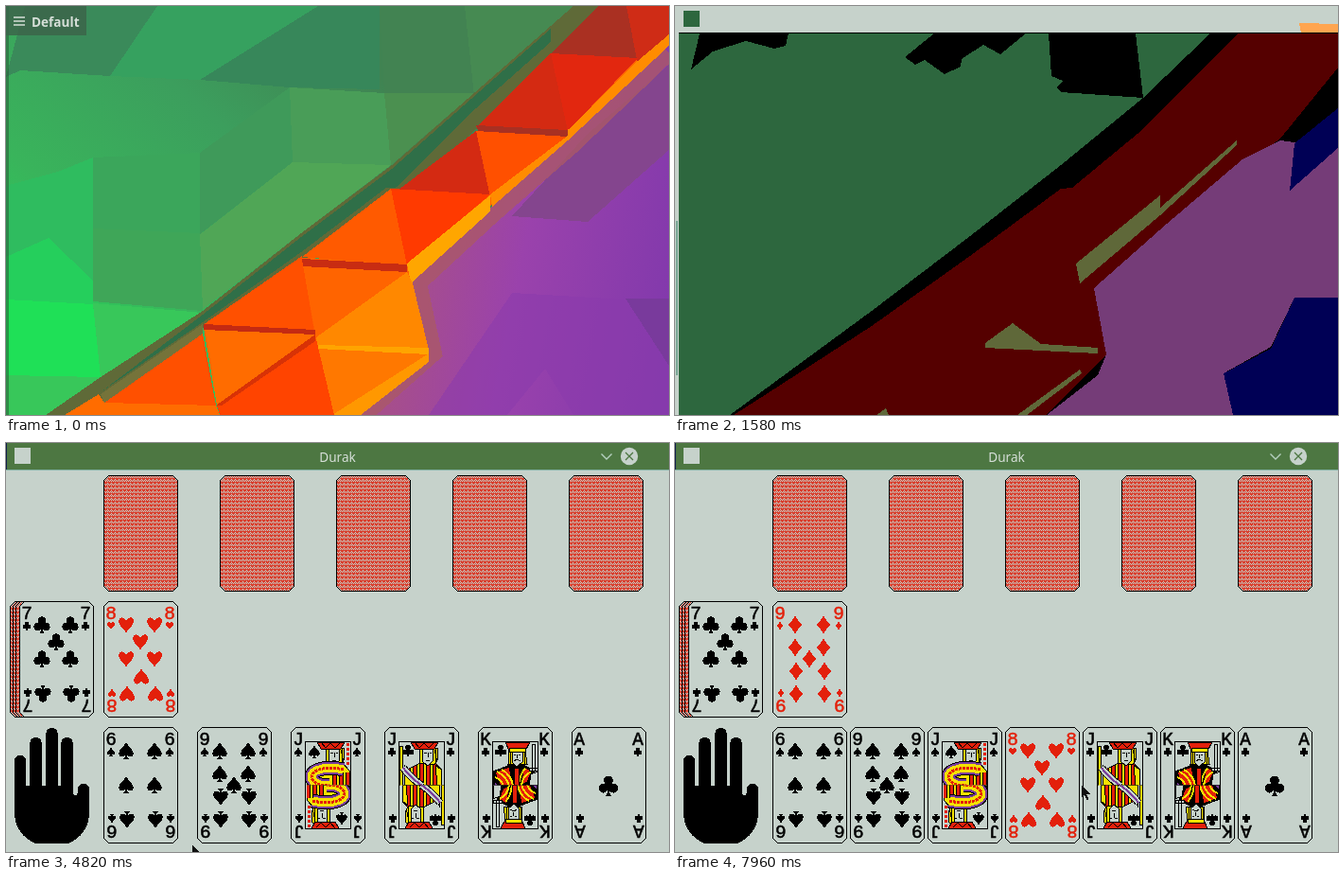
Recreate the animation shown at these times as an HTML page without scripts. Size 701 by 432 pixels, loop 8 s.

```html
<!DOCTYPE html>
<html lang="en">
<head>
<meta charset="utf-8">
<title>Card game</title>
<style>
html, body { margin: 0; width: 100%; height: 100%; overflow: hidden; background: #c6d2cb; }
svg { display: block; }
.stage { width: 701px; height: 432px; }
.desktop, .flash, .game { shape-rendering: crispEdges; }
.smooth { shape-rendering: auto; }
.rank { font: 19.5px "Liberation Mono", monospace; text-anchor: middle; stroke: currentColor; stroke-width: .5; }
.ui { font: 13.6px "Noto Sans", sans-serif; fill: #d6dfd8; }
.bold { font-weight: 700; }
.red { fill: #e3200b; color: #e3200b; }
.ink { stroke: #000; stroke-width: 1; }
.line { fill: none; stroke: #000; }

.desktop, .flash, .game, .deal, .turn, .taken, .cursor { animation: 8s infinite step-end; }
.desktop { animation-name: desktop; }
.flash { animation-name: flash; }
.game { animation-name: game; }
.deal { animation-name: deal; }
.turn { animation-name: turn; }
.taken { animation-name: taken; }
.cursor { animation-name: cursor; }
@keyframes desktop { 0% { opacity: 1 } 19.75%, 100% { opacity: 0 } }
@keyframes flash { 0% { opacity: 0 } 19.75% { opacity: 1 } 20.75%, 100% { opacity: 0 } }
@keyframes game { 0% { opacity: 0 } 20.25% { opacity: .6 } 20.75%, 100% { opacity: 1 } }
@keyframes deal { 0% { opacity: 1 } 41.25%, 100% { opacity: 0 } }
@keyframes turn { 0% { opacity: 0 } 41.25% { opacity: 1 } 91.375%, 100% { opacity: 0 } }
@keyframes taken { 0% { opacity: 0 } 91.375%, 100% { opacity: 1 } }
@keyframes cursor {
  0% { transform: translate(197px, 440px); }
  60.25% { transform: translate(197px, 424px); animation-timing-function: steps(11); }
  65.75% { transform: translate(422px, 348px); animation-timing-function: steps(7); }
  69.25% { transform: translate(403px, 338px); }
  69.75% { transform: translate(402px, 339px); }
  70.5% { transform: translate(398px, 340px); animation-timing-function: steps(5); }
  73% { transform: translate(368px, 349px); }
  76.75% { transform: translate(360px, 350px); animation-timing-function: steps(11); }
  82.25% { transform: translate(50px, 383px); }
  93.125% { transform: translate(58px, 382px); animation-timing-function: steps(9); }
  97.625% { transform: translate(428px, 361px); }
  99.5%, 100% { transform: translate(430px, 361px); }
}
</style>
</head>
<body>
<svg class="stage" viewBox="0 0 701 432">
<defs>
  <linearGradient id="leaf" gradientUnits="userSpaceOnUse" x1="20" y1="390" x2="330" y2="20">
    <stop stop-color="#22da58"/><stop offset=".35" stop-color="#39b45b"/>
    <stop offset=".7" stop-color="#3c9e5d"/><stop offset="1" stop-color="#408352"/>
  </linearGradient>
  <linearGradient id="violet" gradientUnits="userSpaceOnUse" x1="430" y1="290" x2="701" y2="340">
    <stop stop-color="#a64e8c"/><stop offset=".4" stop-color="#9a42ac"/><stop offset="1" stop-color="#8239ac"/>
  </linearGradient>
  <pattern id="weave" width="4" height="4" patternUnits="userSpaceOnUse">
    <path fill="#d93f2e" d="M0 0H4V4H0Z"/>
    <path fill="#c6d2cb" d="M0 0h1v1h-1zM1 1h1v1h-1zM2 2h1v1h-1zM3 1h1v1h-1zM0 2h1v1h-1z"/>
  </pattern>
  <pattern id="stripes" width="7" height="8" patternUnits="userSpaceOnUse">
    <path fill="#f5e100" d="M0 0h2v8H0z"/><path d="M2 0h1v8H2zM6 0h1v8H6z"/><path fill="#e3200b" d="M3 0h3v8H3z"/>
  </pattern>
  <clipPath id="upper"><path d="M16 16h47v45.5H16z"/></clipPath>

  <!-- suits, centred on 0,0 -->
  <path id="heart" d="M0 8.5C-2 4-8 1-8-3.5C-8-9-1.5-9 0-4C1.5-9 8-9 8-3.5C8 1 2 4 0 8.5Z"/>
  <path id="diamond" d="M0-9.5Q3-4 7.5 0Q3 4 0 9.5Q-3 4-7.5 0Q-3-4 0-9.5Z"/>
  <path id="spade" d="M0-9C2-4 8-1 8 3C8 7 3 7 1 4.5Q1 8 3.5 9H-3.5Q-1 8-1 4.5C-3 7-8 7-8 3C-8-1-2-4 0-9Z"/>
  <g id="club"><circle cy="-4.6" r="4.1"/><circle cx="-4.5" cy="2.2" r="4.1"/><circle cx="4.5" cy="2.2" r="4.1"/>
    <path d="M-2-2H2L1 4Q1 8 3 9H-3Q-1 8-1 4Z"/></g>

  <!-- cards, 79 by 123 -->
  <path id="face" d="M5.5.5H73.5L78.5 5.5V117.5L73.5 122.5H5.5L.5 117.5V5.5Z" fill="#c6d2cb" stroke="#000"/>
  <g id="back"><use href="#face"/><path fill="url(#weave)" d="M6 1H73L78 6V117L73 122H6L1 117V6Z"/></g>
  <g id="smallClub"><use href="#club" transform="translate(8 26)scale(.52)"/></g>
  <g id="smallSpade"><use href="#spade" transform="translate(8 26)scale(.52)"/></g>
  <path id="frame" class="line" d="M15.5 15.5h48v92h-48z"/>

  <g id="six-i"><text class="rank" x="8" y="19">6</text><use href="#smallSpade"/></g>
  <g id="six-h"><use href="#six-i"/><use href="#six-i" x="62"/><use href="#spade" x="24" y="25"/><use href="#spade" x="54" y="25"/></g>
  <g id="six"><use href="#face"/><use href="#six-h"/><use href="#six-h" transform="rotate(180 39.5 61.5)"/>
    <use href="#spade" x="24" y="61"/><use href="#spade" x="54" y="61"/></g>

  <g id="seven-i"><text class="rank" x="8" y="19">7</text><use href="#smallClub"/></g>
  <g id="seven-h"><use href="#seven-i"/><use href="#seven-i" x="62"/><use href="#club" x="24" y="25"/><use href="#club" x="54" y="25"/></g>
  <g id="seven"><use href="#face"/><use href="#seven-h"/><use href="#seven-h" transform="rotate(180 39.5 61.5)"/>
    <use href="#club" x="24" y="61"/><use href="#club" x="54" y="61"/><use href="#club" x="39" y="43"/></g>

  <g id="eight-i"><text class="rank" x="8" y="19">8</text><use href="#heart" transform="translate(8 26)scale(.5)"/></g>
  <g id="eight-h"><use href="#eight-i"/><use href="#eight-i" x="62"/><use href="#heart" x="24" y="25"/><use href="#heart" x="54" y="25"/><use href="#heart" x="39" y="43"/></g>
  <g id="eight" class="red"><use href="#face"/><use href="#eight-h"/><use href="#eight-h" transform="rotate(180 39.5 61.5)"/>
    <use href="#heart" x="24" y="61"/><use href="#heart" x="54" y="61"/></g>

  <g id="nine-i"><text class="rank" x="8" y="19">9</text><use href="#smallSpade"/></g>
  <g id="nine-h"><use href="#nine-i"/><use href="#nine-i" x="62"/><use href="#spade" x="24" y="25"/><use href="#spade" x="54" y="25"/><use href="#spade" x="24" y="49"/><use href="#spade" x="54" y="49"/></g>
  <g id="nine"><use href="#face"/><use href="#nine-h"/><use href="#nine-h" transform="rotate(180 39.5 61.5)"/><use href="#spade" x="39" y="61"/></g>

  <g id="nineRed-i"><text class="rank" x="8" y="19">9</text><use href="#diamond" transform="translate(8 26)scale(.5)"/></g>
  <g id="nineRed-h"><use href="#nineRed-i"/><use href="#nineRed-i" x="62"/><use href="#diamond" x="24" y="25"/><use href="#diamond" x="54" y="25"/><use href="#diamond" x="24" y="49"/><use href="#diamond" x="54" y="49"/></g>
  <g id="nineRed" class="red"><use href="#face"/><use href="#nineRed-h"/><use href="#nineRed-h" transform="rotate(180 39.5 61.5)"/><use href="#diamond" x="39" y="61"/></g>

  <g id="ten-i"><path class="line" stroke-width="2" d="M3 8H5V20M9 8H12V19H9Z"/><use href="#smallClub"/></g>
  <g id="ten-h"><use href="#ten-i"/><use href="#ten-i" x="62"/><use href="#club" x="24" y="24"/><use href="#club" x="54" y="24"/><use href="#club" x="24" y="49"/><use href="#club" x="54" y="49"/><use href="#club" x="39" y="37"/></g>
  <g id="ten"><use href="#face"/><use href="#ten-h"/><use href="#ten-h" transform="rotate(180 39.5 61.5)"/></g>

  <g id="ace-i"><text class="rank" x="8" y="19">A</text><use href="#smallClub"/></g>
  <g id="ace-h"><use href="#ace-i"/><use href="#ace-i" x="62"/></g>
  <g id="ace"><use href="#face"/><use href="#ace-h"/><use href="#ace-h" transform="rotate(180 39.5 61.5)"/><use href="#club" transform="translate(39 62)scale(1.2)"/></g>

  <!-- court cards -->
  <g id="head">
    <path class="ink" fill="#f5e100" d="M37 22H56Q59 34 53 40L38 38Z"/>
    <path class="ink" fill="#c6d2cb" d="M40 22H51V36L46 41L41 37Z"/>
    <path class="ink" fill="#e3200b" d="M28 16H57L53 23H32Z"/>
    <path class="line" d="M32 16L37 22L42 17L47 22L52 17M42 27H45M48 27H50M46 27V32M44 35H48M53 24L56 37M54 23V39"/>
  </g>
  <g id="jackClub-i"><text class="rank" x="8" y="19">J</text><use href="#smallClub"/></g>
  <g id="jackClub-h"><use href="#jackClub-i"/><use href="#jackClub-i" x="62"/>
    <g clip-path="url(#upper)">
      <path class="ink" fill="url(#stripes)" d="M22 46L38 38H54L60 44V62H22Z"/>
      <path class="ink" fill="#f5e100" d="M21 40L37 62H21ZM54 40L60 45V62H56Z"/>
      <path class="ink" fill="#f5e100" d="M16 20H19V62H16Z"/>
      <use href="#head"/>
      <g fill="none">
        <path id="sash" class="line" stroke-width="8" d="M20 43Q26 52 40 62"/>
        <use href="#sash"/>
        <path stroke="#c6d2cb" stroke-width="6" d="M20 43Q26 52 40 62"/>
        <path stroke="#7a3d9c" stroke-width="2" d="M20 43Q26 52 40 62"/>
      </g>
    </g><use href="#club" transform="translate(25 25)scale(.72)"/></g>
  <g id="jackClub"><use href="#face"/><use href="#jackClub-h"/><use href="#jackClub-h" transform="rotate(180 39.5 61.5)"/><use href="#frame"/></g>

  <g id="jackSpade-i"><text class="rank" x="8" y="19">J</text><use href="#smallSpade"/></g>
  <g id="jackSpade-h"><use href="#jackSpade-i"/><use href="#jackSpade-i" x="62"/>
    <g clip-path="url(#upper)">
      <path class="ink" fill="#f5e100" d="M17 46L38 38H55L62 46V62H17Z"/>
      <path fill="url(#stripes)" d="M44 48H62V62H44Z"/>
      <use href="#head"/>
      <g fill="none">
        <path stroke="#000" stroke-width="15" d="M56 45C34 40 16 47 24 57Q29 62 41 62"/>
        <path stroke="#7a3d9c" stroke-width="13" d="M56 45C34 40 16 47 24 57Q29 62 41 62"/>
        <path stroke="#f5e100" stroke-width="9" d="M56 45C34 40 16 47 24 57Q29 62 41 62"/>
        <path stroke="#e3200b" stroke-width="3" stroke-dasharray="3 1" d="M56 45C34 40 16 47 24 57Q29 62 41 62"/>
        <path d="M60 17V40" stroke="#e3200b" stroke-width="3" stroke-dasharray="3 2"/>
      </g>
    </g><use href="#spade" transform="translate(25 26)scale(.75)"/></g>
  <g id="jackSpade"><use href="#face"/><use href="#jackSpade-h"/><use href="#jackSpade-h" transform="rotate(180 39.5 61.5)"/><use href="#frame"/></g>

  <g id="king-i"><text class="rank" x="8" y="19">K</text><use href="#smallClub"/></g>
  <g id="king-h"><use href="#king-i"/><use href="#king-i" x="62"/>
    <g clip-path="url(#upper)" class="ink">
      <path d="M16 47L34 40H48L59 46V62H16Z"/>
      <path fill="#e3200b" d="M18 48L33 42L37 62H24ZM49 42L57 47L52 58L45 62Z"/>
      <g fill="none" stroke="#f5e100" stroke-width="2">
        <path d="M20 47Q30 52 33 62M25 45Q35 50 37 62M18 53Q25 56 27 62M56 47Q47 52 46 62M50 44Q44 50 43 62"/>
      </g>
      <path fill="#c6d2cb" d="M56 50L63 47V62H54Z"/><path fill="#7a3d9c" d="M17 57L23 62H17Z"/>
      <path fill="#e3200b" d="M38 43H43V62H38Z"/>
      <path fill="#f5e100" d="M33 25H50L52 39H32Z"/>
      <path fill="#c6d2cb" d="M36 25H47V37L41 42L36 37Z"/>
      <path fill="#e3200b" d="M29 16H55L50 25H33Z"/><path fill="#f5e100" d="M33 22H50V26H33Z"/>
      <path class="line" d="M38 29H40M43 29H45M41.5 29V33M38 36L41 34L45 36M34 26V39M49 26V39"/>
      <path fill="#c6d2cb" d="M57 18H60V46H57ZM54 43H63V46H54Z"/>
    </g><use href="#club" transform="translate(24 25)scale(.72)"/></g>
  <g id="king"><use href="#face"/><use href="#king-h"/><use href="#king-h" transform="rotate(180 39.5 61.5)"/><use href="#frame"/></g>

  <g id="hand"><path d="M15 336V392M31.5 317V392M48.5 307V392M64.5 317V392M82 366V392" stroke="#000" stroke-width="12.5" stroke-linecap="round"/>
    <path d="M9 362H71V370Q75 376 76 368L88 376V393Q86 414 66 423H31Q11 414 9 393Z"/></g>
  <g id="fiveBacks"><use href="#back" x="103" y="34"/><use href="#back" x="226" y="34"/><use href="#back" x="349" y="34"/><use href="#back" x="472" y="34"/><use href="#back" x="595" y="34"/></g>
</defs>

<g class="desktop">
  <path fill="url(#leaf)" d="M0 0H701V432H0Z"/>
  <path fill="#37875a" d="M205 78L330 0H395V88L300 86Z"/>
  <path fill="#3a8a5a" d="M0 75L20 0H160L110 74L15 68Z"/>
  <path fill="#36a15f" d="M110 74L160 0H330L205 78Z"/>
  <path fill="#428352" d="M395 0H485L495 95L400 92Z"/>
  <path fill="#468a52" d="M485 0H600L495 95Z"/>
  <path fill="#499d58" d="M300 86L400 92L407 168L303 165Z"/>
  <path fill="#4b9050" d="M400 92H495L407 168Z"/>
  <path fill="#3f9a5a" d="M205 155L300 86L303 165L200 245Z"/>
  <path fill="#50a656" d="M303 165L407 168L312 240L208 320L203 243Z"/>
  <path fill="#3ba65b" d="M92 160L205 155V240L92 235Z"/>
  <path fill="#3fa658" d="M92 235L205 240L208 322L92 312Z"/>
  <path fill="#2fbc5f" d="M0 190L55 175L92 160V315L0 307Z"/>
  <path fill="#25cf5c" d="M0 265L45 245L92 290V315L0 310Z"/>
  <path fill="#1fe057" d="M0 310L92 315L100 392L0 390Z"/>
  <path fill="#38c75a" d="M0 390L100 392L45 432H0ZM92 314L208 324L100 392Z"/>
  <path fill="#285c3a" opacity=".55" d="M0 0H3V432H0Z"/>
  <path fill="#5f6a38" d="M600 0H640L420 200L312 270L208 340L104 419L62 432H42L100 392L208 322L312 240L408 168Z"/>
  <path fill="#75733a" d="M208 336V350L104 419L100 410Z"/>
  <path fill="#2f6f48" d="M576 24V38L497 108L412 192H402L312 260L208 334L100 408L208 326L312 244L408 172Z"/>
  <path fill="url(#violet)" d="M701 35L428 293L447 365L370 432H701Z"/>
  <path fill="#84458e" d="M701 62L615 135L535 222L615 228L701 152Z"/>
  <path fill="#8b3bae" d="M535 303L655 310L701 350V432H600L570 383L530 432H447Z" opacity=".55"/>
  <path fill="#793a9c" d="M655 309H701V380Z"/>
  <path fill="none" stroke="#ab5868" stroke-width="16" opacity=".8" d="M701 50L600 147L514 222L437 293L453 367L375 436"/>
  <path fill="#ff6400" d="M668 55L594 131L512 198L424 270L313 266L209 340L223 422L347 432L447 365L428 290L514 210L594 140L701 40V30Z"/>
  <path fill="#aa3022" d="M626 0H656L668 57L576 50Z"/>
  <path fill="#cf2c16" d="M656 0H701V32L668 62Z"/>
  <path fill="#d42a12" d="M576 50L594 132L497 128ZM497 132L415 194L512 199Z"/>
  <path fill="#e2270f" d="M576 50L668 55L594 132Z"/>
  <path fill="#a83022" d="M497 126L594 131V139L500 134Z"/>
  <path fill="#ff5000" d="M497 132L594 138L512 202ZM313 264L208 337L327 345ZM208 346L222 422L104 419Z"/>
  <path fill="#ff8c00" d="M701 30V42L594 142L514 212L512 199L594 137V131L668 58Z"/>
  <path fill="#ff3a00" d="M407 193L512 199L424 274Z"/>
  <path fill="#ffa600" d="M424 272L512 200V217L428 293Z"/>
  <path fill="#ff5a00" d="M407 193L424 274L313 265ZM313 267L330 276L328 357Z"/>
  <path fill="#ff6400" d="M314 274L424 280L328 352Z"/>
  <path fill="#c82c12" d="M313 267L424 273V281L314 275Z"/>
  <path fill="#ff8800" d="M424 281L430 293L447 363L328 358V350Z"/>
  <path fill="#ff7800" d="M328 360L447 367L345 432Z"/>
  <path fill="#ffa400" d="M328 358L447 361V368L330 362Z"/>
  <path fill="#ff9800" d="M447 367V376L375 432H345Z"/>
  <path fill="#ff6c00" d="M210 342L327 347L223 422ZM98 410L104 419L222 422L226 432H62Z"/>
  <path fill="#ff4400" d="M328 352L347 432H226L223 422Z"/>
  <path fill="#c42a12" d="M209 336L327 342V347L209 342Z"/>
  <path fill="#d83206" d="M327 347V354L228 422H222Z"/>
  <path fill="#3b654a" opacity=".85" d="M0 0H85V31H0Z"/>
  <path class="smooth" d="M8 12H20M8 16H20M8 20H20" stroke="#d6dfd8" stroke-width="1.6"/>
  <text class="ui bold" x="27" y="21.5">Default</text>
</g>

<g class="flash">
  <path d="M0 0H701V432H0Z"/>
  <path fill="#2d673e" d="M4 29H566L495 97L408 168L312 243L208 322L58 432H4Z"/>
  <path d="M26 29H120L117 42L105 45L75 37L40 48L17 67ZM274 29H371L344 51L326 41L303 56L302 64L285 72L264 57L254 62L243 54ZM395 29H487L495 97L408 91L404 86L410 79L398 74Z"/>
  <path fill="#550000" d="M595 29H701V65L640 140L520 230L443 298L456 368L393 432H62L98 409L208 338L312 264L408 193L420 192L495 130Z"/>
  <path fill="#753c78" d="M600 162L640 142L701 150V308H655L630 360L580 388L590 432H393L447 390L456 368L443 298L520 230Z"/>
  <path fill="#000055" d="M701 108L655 145L650 195L701 150ZM655 308H701V432H590L580 388L630 362Z"/>
  <path fill="#5f6839" d="M594 142L513 213V200L424 272L428 293L513 221L594 147ZM328 356L357 335L387 357L447 361V367L328 361ZM428 384L362 432H372L430 388ZM213 432L223 425L226 432Z"/>
  <path fill="#c6d2cb" d="M0 0H701V28H0ZM0 28H4V432H0Z"/><path fill="#79a695" d="M1 227H3V390H1Z"/>
  <path fill="#ffa550" d="M660 18L701 19V28H662Z"/>
  <path fill="#2d673e" d="M9 5H26V22H9Z"/>
</g>

<g class="game">
  <path fill="#c6d2cb" d="M0 0H701V432H0Z"/>
  <path fill="#4d7742" d="M0 0H701V28H0Z"/><path fill="#82b0a2" d="M0 28H701V29H0Z"/><path fill="#10204a" d="M0 0H1V28H0Z"/>
  <path fill="#c6d2cb" d="M9 5H26V22H9Z"/>
  <text class="ui" x="350.5" y="20" text-anchor="middle">Durak</text>
  <g class="smooth">
    <path d="M629.5 11.5L635 17L640.5 11.5" fill="none" stroke="#b5d0c0" stroke-width="1.4"/>
    <circle cx="659" cy="14" r="9.2" fill="#c6d2cb"/><path d="M655 10L663 18M663 10L655 18" stroke="#4d7742" stroke-width="1.3"/>
  </g>
  <use href="#back" x="4" y="167"/><use href="#back" x="7" y="167"/><use href="#back" x="10" y="167"/><use href="#seven" x="14" y="167"/>

  <g class="deal">
    <g id="row"><use href="#back" x="103" y="34"/><use href="#back" x="202" y="34"/><use href="#back" x="301" y="34"/><use href="#back" x="499" y="34"/></g>
    <use href="#back" x="400" y="34"/><use href="#ten" x="598" y="34"/>
    <use href="#row" y="266"/><use href="#jackClub" x="400" y="300"/><use href="#back" x="598" y="300"/>
  </g>
  <g class="turn">
    <use href="#fiveBacks"/><use href="#eight" x="103" y="167"/><use href="#hand"/>
    <use href="#six" x="103" y="300"/><use href="#nine" x="202" y="300"/><use href="#jackSpade" x="301" y="300"/>
    <use href="#jackClub" x="400" y="300"/><use href="#king" x="499" y="300"/><use href="#ace" x="598" y="300"/>
  </g>
  <g class="taken">
    <use href="#fiveBacks"/><use href="#nineRed" x="103" y="167"/><use href="#hand"/>
    <use href="#six" x="103" y="300"/><use href="#nine" x="185" y="300"/><use href="#jackSpade" x="267" y="300"/>
    <use href="#eight" x="349" y="300"/><use href="#jackClub" x="431" y="300"/><use href="#king" x="513" y="300"/><use href="#ace" x="595" y="300"/>
  </g>
  <path class="cursor" d="M0 0V13L3 10.5L5.5 16L7.5 15L5.2 10H9Z" fill="#101010"/>
</g>
</svg>
</body>
</html>
```
